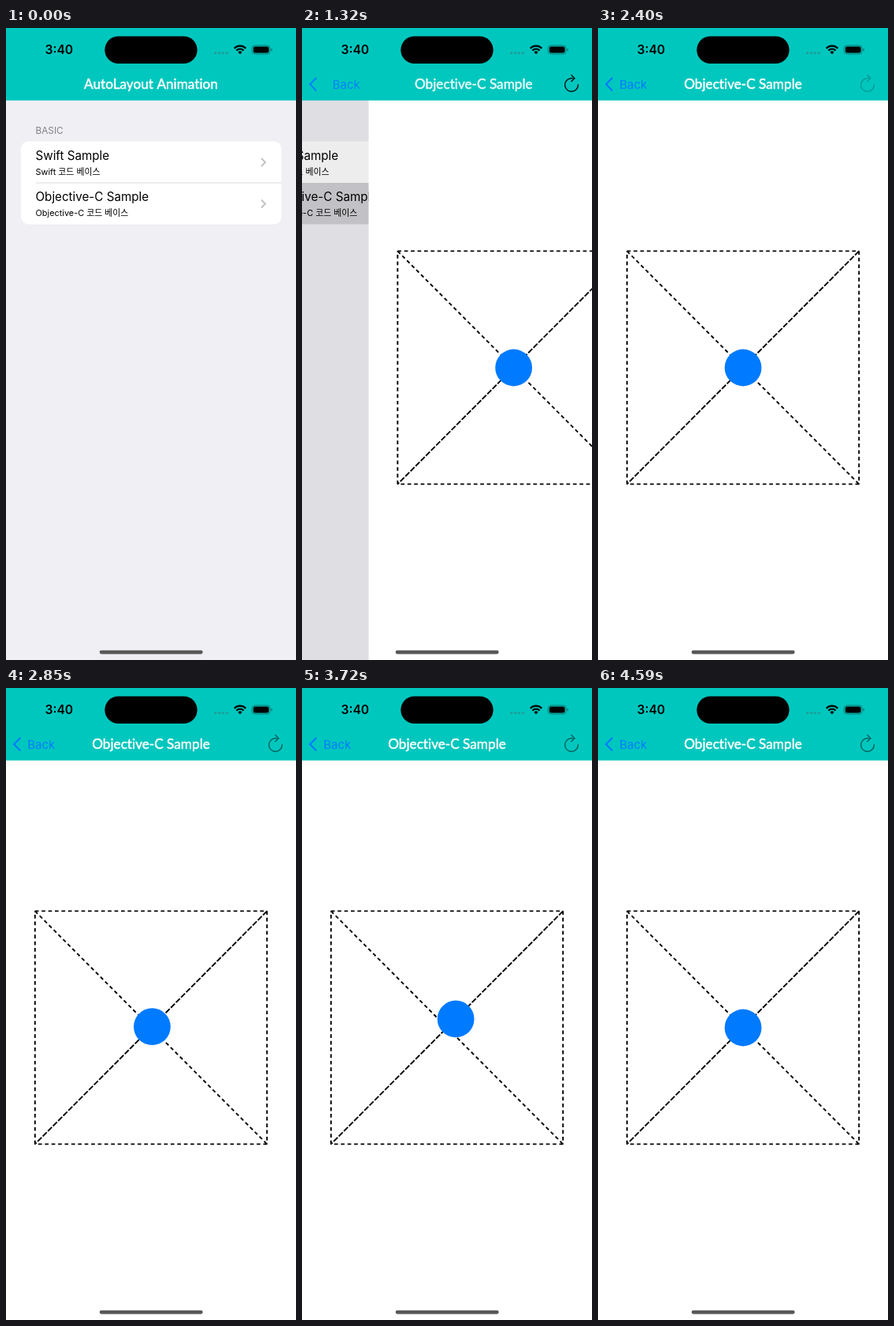
An HTML page with a canvas for the animation above (4.62 s loop, 368x800 px).

```html
<!DOCTYPE html>
<html lang="en">
<head>
<meta charset="utf-8">
<title>AutoLayout Animation</title>
<style>
  html, body { margin: 0; width: 100%; height: 100%; overflow: hidden; background: #fff; }
  canvas { display: block; width: 368px; height: 800px; }
</style>
</head>
<body>
<canvas id="stage"></canvas>
<script>
const W = 368, H = 800, LOOP = 4620, STEP = 30;
const TEAL = '#00c7be', BLUE = '#007aff', PAGE = '#efeff4';
const BAR = 91.7;
const UI = 'Inter, "Noto Sans CJK KR", "Noto Sans CJK", sans-serif';

const canvas = document.getElementById('stage');
const ctx = canvas.getContext('2d');
const ratio = window.devicePixelRatio || 1;
canvas.width = W * ratio;
canvas.height = H * ratio;

const clamp = v => Math.max(0, Math.min(1, v));
const mix = (a, b, k) => a + (b - a) * k;

// cubic-bezier(.42, 0, .58, 1)
function ease(x) {
  if (x <= 0) return 0;
  if (x >= 1) return 1;
  let lo = 0, hi = 1;
  for (let i = 0; i < 24; i++) {
    const u = (lo + hi) / 2;
    const bx = 1.26 * u * (1 - u) ** 2 + 1.74 * u * u * (1 - u) + u ** 3;
    if (bx < x) lo = u; else hi = u;
  }
  return lo * lo * (3 - 2 * lo);
}

// Critically damped push: 0 = list, 1 = detail
function pushProgress(t) {
  if (t < 1125) return 0;
  if (t >= 1710) return 1;
  const w = (t - 1125) * 0.0144;
  return 1 - (1 + w) * Math.exp(-w);
}

function trip(t, start, leg) {
  const k = (t - start) / leg;
  return k < 1 ? ease(k) : 1 - ease(k - 1);
}

function text(str, x, y, font, color, align = 'left', alpha = 1) {
  ctx.save();
  ctx.globalAlpha *= alpha;
  ctx.font = font;
  ctx.fillStyle = color;
  ctx.textAlign = align;
  ctx.fillText(str, x, y);
  ctx.restore();
}

// Medium weight without ligatures
function barTitle(str, x, alpha) {
  ctx.save();
  ctx.globalAlpha = alpha;
  ctx.font = '17.2px Lato, sans-serif';
  ctx.textRendering = 'optimizeSpeed';
  ctx.textAlign = 'center';
  ctx.fillStyle = ctx.strokeStyle = '#fff';
  ctx.lineWidth = 0.5;
  ctx.lineJoin = 'round';
  ctx.fillText(str, x, 77);
  ctx.strokeText(str, x, 77);
  ctx.restore();
}

function box(x, y, w, h, r, color) {
  ctx.beginPath();
  ctx.roundRect(x, y, w, h, r);
  ctx.fillStyle = color;
  ctx.fill();
}

function disc(x, y, r, color) {
  ctx.beginPath();
  ctx.arc(x, y, r, 0, Math.PI * 2);
  ctx.fillStyle = color;
  ctx.fill();
}

function line(points, color, width, dash = []) {
  ctx.beginPath();
  points.forEach(([x, y]) => ctx.lineTo(x, y));
  ctx.strokeStyle = color;
  ctx.lineWidth = width;
  ctx.setLineDash(dash);
  ctx.stroke();
  ctx.setLineDash([]);
}

function drawRow(y, name, selected) {
  text(name + ' Sample', 37.5, y + 23, '15.2px ' + UI, '#000');
  text(name + ' 코드 베이스', 37.5, y + 42, '10.9px ' + UI, '#000');
  const color = selected ? '#abaaae' : '#c3c3c6';
  line([[324, y + 21.5], [329, y + 26.5], [324, y + 31.5]], color, 2);
}

function drawList(selected) {
  ctx.fillStyle = PAGE;
  ctx.fillRect(0, 90, W, H - 90);
  text('BASIC', 37.5, 134, '11.8px ' + UI, '#838388');
  box(19, 143.5, 330.5, 105, 9.5, '#fff');
  if (selected) box(19, 196, 330.5, 52.5, [0, 0, 9.5, 9.5], '#d1d0d4');
  else line([[37.5, 196], [349.5, 196]], '#d2d2d5', 0.8);
  drawRow(143.5, 'Swift', false);
  drawRow(196, 'Objective-C', selected);
}

function ballOffset(t) {
  if (t >= 2816 && t < 3816) {
    const d = 147.2 * trip(t, 2816, 500);
    return [d, -d];
  }
  if (t >= 3816 && t < 4582) {
    const d = 147.2 * trip(t, 3816, 383);
    return [-d, -d];
  }
  return [0, 0];
}

function drawDetail(t) {
  const l = 36.8, r = 331.2, top = 282.4, bottom = 577.4;
  const dash = [4.7, 3.7];
  ctx.fillStyle = '#fff';
  ctx.fillRect(0, 90, W, H - 90);
  line([[l, top], [r, top]], '#000', 1.9, dash);
  line([[r, top], [r, bottom]], '#000', 1.9, dash);
  line([[r, bottom], [l, bottom]], '#000', 1.9, dash);
  line([[l, bottom], [l, top]], '#000', 1.9, dash);
  line([[l, top], [r, bottom]], '#000', 1.9, dash);
  line([[r, top], [l, bottom]], '#000', 1.9, [7.2, 2]);
  const [dx, dy] = ballOffset(t);
  disc(184.1 + dx, 430 + dy, 23.4, BLUE);
}

function drawReload(alpha) {
  ctx.save();
  ctx.globalAlpha = alpha;
  ctx.beginPath();
  ctx.arc(342, 72, 8.4, -0.1, Math.PI * 1.58);
  ctx.moveTo(341.5, 59.3);
  ctx.lineTo(345.9, 63.7);
  ctx.lineTo(341.5, 68);
  ctx.strokeStyle = '#000';
  ctx.lineWidth = 1.5;
  ctx.stroke();
  ctx.restore();
}

function reloadAlpha(t) {
  if (t < 2400) return 1;
  return mix(0.22, 0.5, clamp((t - 2505) / 300));
}

function drawStatus() {
  text('3:40', 67.3, 33.3, '600 15.7px ' + UI, '#000', 'center');
  box(125.3, 10.5, 117.4, 34.6, 17.3, '#000');
  for (let i = 0; i < 4; i++) disc(265.8 + i * 4.9, 31.6, 1.7, '#1c9f98');

  ctx.strokeStyle = '#000';
  ctx.lineWidth = 2.2;
  for (const r of [10.3, 6.5]) {
    ctx.beginPath();
    ctx.arc(297, 33, r, -Math.PI * 0.75, -Math.PI * 0.25);
    ctx.stroke();
  }
  ctx.beginPath();
  ctx.moveTo(297, 33.3);
  ctx.arc(297, 33, 3.6, -Math.PI * 0.75, -Math.PI * 0.25);
  ctx.fillStyle = '#000';
  ctx.fill();

  ctx.beginPath();
  ctx.roundRect(312.2, 22, 23, 11, 3.5);
  ctx.strokeStyle = '#087b75';
  ctx.lineWidth = 1;
  ctx.stroke();
  box(313.8, 23.6, 19.8, 7.8, 2.2, '#000');
  box(336.4, 25.7, 1.4, 3.6, 1, '#087b75');
}

function drawBar(t, p) {
  const rest = 1 - p;
  ctx.fillStyle = TEAL;
  ctx.fillRect(0, 0, W, BAR);
  drawStatus();
  barTitle('AutoLayout Animation', 184 - 110 * p, clamp(1 - p * 1.8));
  if (p === 0) return;
  const shown = clamp((p - 0.15) / 0.7);
  barTitle('Objective-C Sample', 184 + 147 * rest, shown);
  text('Back', 27.3 + 50 * rest, 76.8, '15px ' + UI, BLUE, 'left', shown);
  ctx.globalAlpha = shown;
  line([[18.3, 63], [10.2, 71.2], [18.3, 79.4]], BLUE, 2.1);
  ctx.globalAlpha = 1;
  drawReload(shown * reloadAlpha(t));
}

function draw(t) {
  const p = pushProgress(t);
  ctx.setTransform(ratio, 0, 0, ratio, 0, 0);
  ctx.globalAlpha = 1;
  if (p < 1) {
    ctx.save();
    ctx.translate(-0.3 * W * p, 0);
    drawList(t >= 1110);
    ctx.restore();
    if (p > 0) {
      ctx.fillStyle = PAGE;
      ctx.fillRect(W * (1 - 0.3 * p), 90, W, H);
      ctx.fillStyle = `rgba(0,0,0,${0.09 * p})`;
      ctx.fillRect(0, 90, W, H);
    }
  }
  if (p > 0) {
    ctx.save();
    ctx.translate(W * (1 - p), 0);
    drawDetail(t);
    ctx.restore();
  }
  drawBar(t, p);
  box(118.7, 787.7, 131, 4.7, 2.3, '#585858');
}

const start = performance.now();
function tick() {
  const t = (performance.now() - start) % LOOP;
  draw(Math.floor(t / STEP) * STEP);
  requestAnimationFrame(tick);
}
tick();
</script>
</body>
</html>
```
